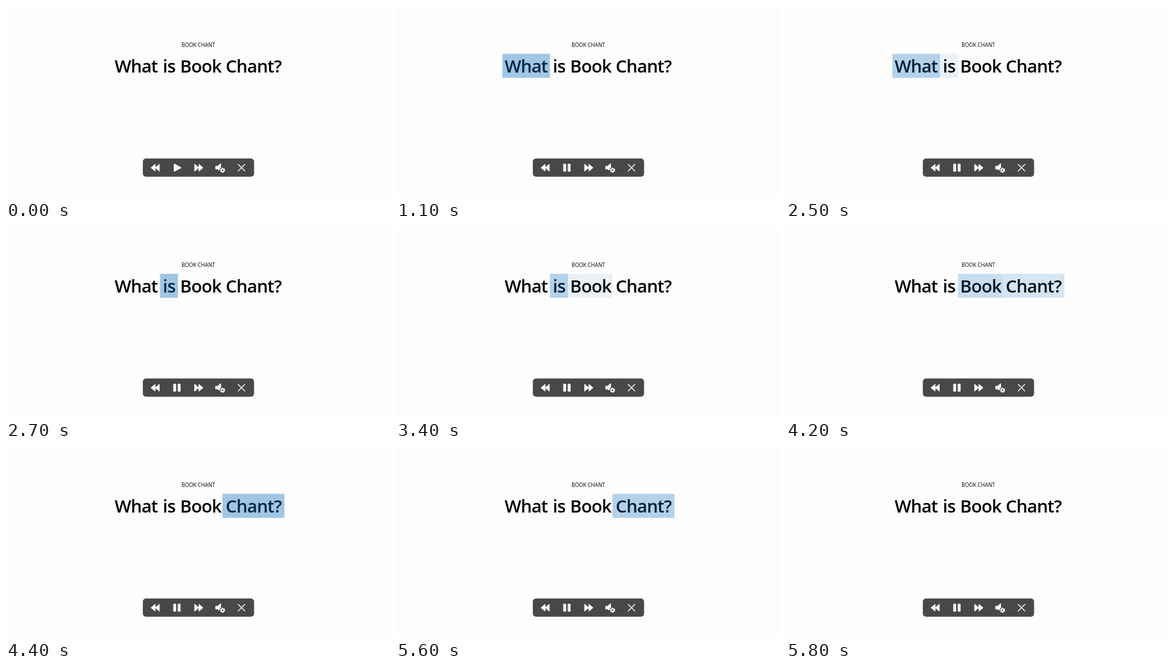
An HTML page that plays this animation: 600 by 300 pixels, repeating every 6400 ms.

```html
<!DOCTYPE html>
<html lang="en">
<head>
<meta charset="utf-8">
<title>Book Chant</title>
<style>
  html, body { margin: 0; width: 100%; height: 100%; overflow: hidden; background: #fdfdfd; }
  svg { display: block; width: 100%; height: 100%; }
  text { font-family: "Open Sans", "Noto Sans", sans-serif; }
  .label { font-size: 8.2px; font-weight: 500; text-anchor: middle; }
  .title { font-size: 27.5px; font-weight: 600; letter-spacing: -.75px; }
  .mark { fill: #0067b8; }
  .icons { fill: #fff; stroke: #fff; stroke-linejoin: round; stroke-linecap: round; }
</style>
</head>
<body>
<svg viewBox="0 0 600 300">
  <rect width="600" height="300" fill="#fdfdfd"/>
  <text class="label" x="300.5" y="64.3">BOOK CHANT</text>
  <g class="title">
    <text x="169.7" y="103.7">What</text>
    <text x="245" y="103.7">is</text>
    <text x="272" y="103.7">Book</text>
    <text x="343.3" y="103.7">Chant?</text>
  </g>
  <g class="mark">
    <rect x="166.2" y="74.7" width="74.4" height="37.5"/>
    <rect x="240.6" y="74.7" width="28.1" height="37.5"/>
    <rect x="268.7" y="74.7" width="69.5" height="37.5"/>
    <rect x="338.2" y="74.7" width="96.8" height="37.5"/>
  </g>

  <rect x="213.8" y="238.3" width="173.8" height="28.4" rx="5" fill="#484848"/>
  <g class="icons">
    <path d="M226.8 252.5l6.2-5.2v10.4zM233.4 252.5l6.2-5.2v10.4z"/>
    <path id="play" d="M263 247.3v10.8l10.2-5.4z" stroke-width="1.6"/>
    <path id="pause" d="M262.2 247h3v11.2h-3zM269.2 247h3v11.2h-3z"/>
    <path d="M301 252.5l-6.2-5.2v10.4zM307.6 252.5l-6.2-5.2v10.4z"/>
    <path d="M328 250.3h2.5l5-4v11.4l-5-2.9h-2.5z"/>
    <circle cx="338.4" cy="256.6" r="4.8" fill="#484848" stroke="none"/>
    <circle cx="338.4" cy="256.6" r="2.2" fill="none" stroke-width="1.8"/>
    <circle cx="338.4" cy="256.6" r="3.4" fill="none" stroke-width="1.3"
            stroke-linecap="butt" stroke-dasharray="1.8 1.76"/>
    <path d="M362.8 247.5l10.3 10.3M373.1 247.5l-10.3 10.3" stroke-width="1.3"/>
  </g>
</svg>
<script>
  const LOOP = 6400, STEP = 100, STRENGTH = 0.37;
  // Start and end of each crossfade to the next word
  const fades = [[900, 1100], [2500, 2700], [3400, 3600], [4100, 4400], [5600, 5800]];
  const marks = document.querySelectorAll('.mark rect');
  const play = document.getElementById('play');
  const pause = document.getElementById('pause');

  const progress = (time, [start, end]) =>
    time < start ? 0 : Math.min(1, (time - start + STEP / 2) / (end - start + STEP / 2));

  function draw(now) {
    const time = Math.floor(now % LOOP / STEP) * STEP;
    const levels = fades.map(fade => progress(time, fade));
    marks.forEach((mark, i) =>
      mark.setAttribute('opacity', STRENGTH * (levels[i] - levels[i + 1])));
    play.setAttribute('opacity', 1 - levels[0]);
    pause.setAttribute('opacity', levels[0]);
  }

  const origin = performance.now();
  function tick() {
    draw(performance.now() - origin);
    requestAnimationFrame(tick);
  }
  tick();
</script>
</body>
</html>
```
